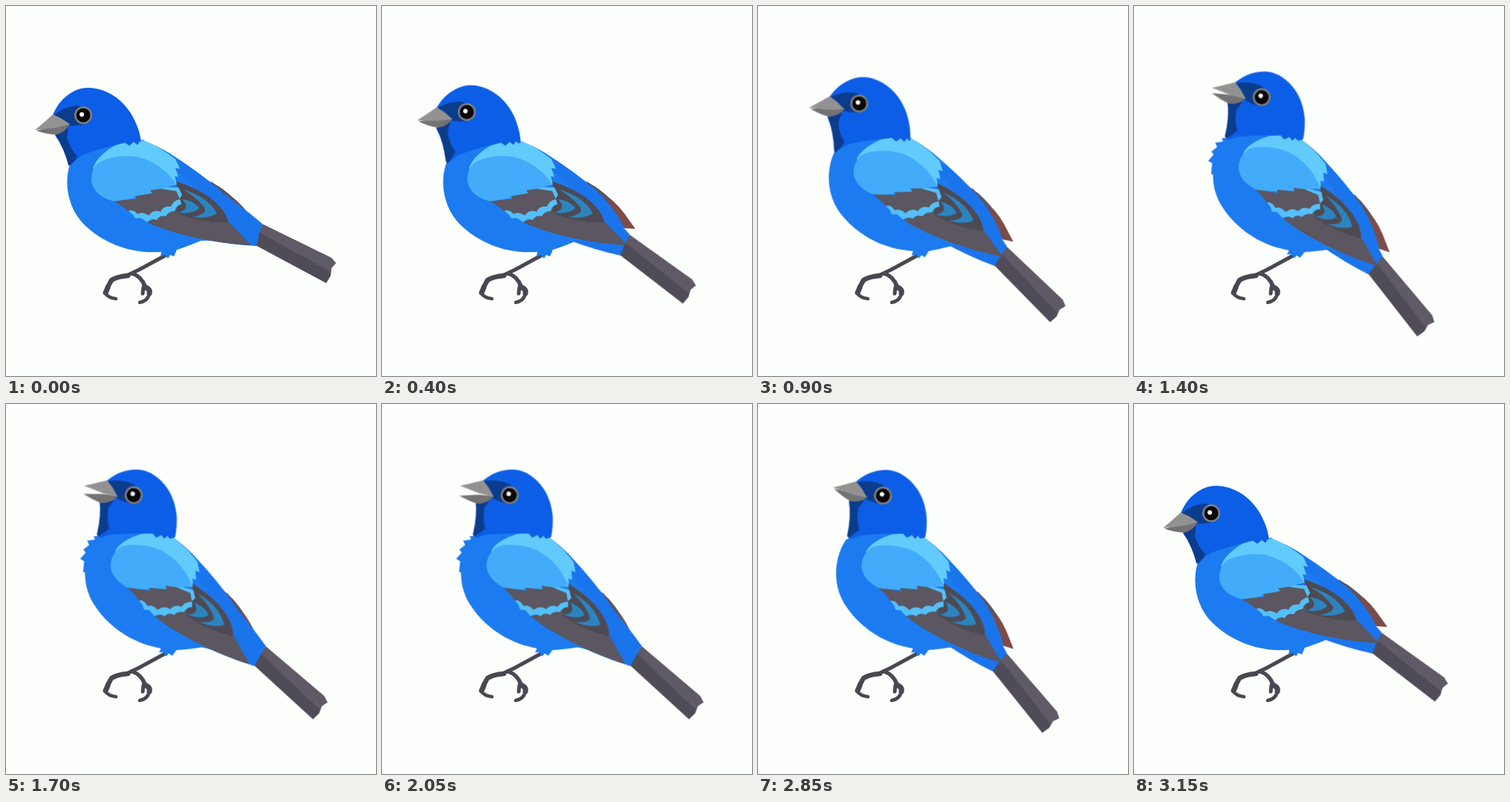
An HTML page that plays this animation: 498 by 498 pixels, repeating every 3200 ms.

```html
<!DOCTYPE html>
<html lang="en">
<head>
<meta charset="utf-8">
<title>Blue bird</title>
<style>
  html, body { margin: 0; width: 100%; height: 100%; overflow: hidden; background: #fdfffc; }
  svg { display: block; width: 100vw; height: 100vh; }

  .bird, .head, .tail, .jaw, .ruffle { animation: 3200ms linear infinite; }
  .bird { transform-origin: 217px 328px; animation-name: lean; }
  .head { transform-origin: 142px 222px; animation-name: nod; }
  .tail { transform-origin: 252px 230px; animation-name: flick; }
  .jaw { transform-origin: 85px 160px; animation-name: sing; }
  .ruffle { animation-name: puff; animation-timing-function: step-end; }

  @keyframes lean {
    0%, 18.75% { transform: rotate(0deg); animation-timing-function: ease-in-out; }
    36.5%, 87.5% { transform: rotate(14.3deg); animation-timing-function: ease-in-out; }
    97.5%, 100% { transform: rotate(0deg); }
  }
  @keyframes nod {
    0%, 3% { transform: rotate(0deg); animation-timing-function: ease-in-out; }
    9%, 13.5% { transform: rotate(7.5deg); animation-timing-function: ease-in-out; }
    18.5%, 22.5% { transform: rotate(0deg); animation-timing-function: ease-in-out; }
    36.5%, 87.5% { transform: rotate(13.5deg); animation-timing-function: ease-in-out; }
    97.5%, 100% { transform: rotate(0deg); }
  }
  /* The loop point is a hard snap upwards. */
  @keyframes flick {
    0%, 6% { transform: rotate(0deg); }
    8%, 48% { transform: rotate(9.5deg); }
    51%, 70.5% { transform: rotate(0deg); }
    73.5%, 100% { transform: rotate(9.5deg); }
  }
  @keyframes sing {
    0%, 36% { transform: rotate(0deg); }
    39%, 45% { transform: rotate(-7deg); }
    48%, 52% { transform: rotate(-15deg); }
    55% { transform: rotate(-7deg); }
    58%, 70% { transform: rotate(-15deg); }
    73%, 82% { transform: rotate(-7deg); }
    85%, 100% { transform: rotate(0deg); }
  }
  @keyframes puff {
    0% { opacity: 0; }
    37.5% { opacity: 1; }
    73.4%, 100% { opacity: 0; }
  }
</style>
</head>
<body>
<svg viewBox="0 0 498 498">
  <defs>
    <clipPath id="neck">
      <path d="M-60 -60H320V150L205 176L194 180L184 185L180 182L177 187L172 183L166 188L160 184Q130 191 110 198Q98 202 87 214L60 222H-60Z"/>
    </clipPath>
  </defs>

  <g fill="none" stroke="#4b4751" stroke-linecap="round" stroke-linejoin="round">
    <path stroke-width="5" d="M214 336L179 355L160 364"/>
    <path stroke-width="6.5" d="M164 363Q150 364 142 369L137 378"/>
    <path stroke-width="7" d="M137 379L134 386"/>
    <path stroke-width="4.5" d="M134 387Q138 393 148 394"/>
    <path stroke-width="5.5" d="M170 360Q182 364 187 377"/>
    <path stroke-width="7" d="M187 378Q195 382 193 387"/>
    <path stroke-width="4.5" d="M193 387Q191 397 180 399"/>
    <path stroke-width="5" d="M185 378L184 387"/>
  </g>

  <g class="bird">
    <path fill="#7c4c48" d="M276 236L287 244Q314 262 326 279L341 300L326 299L280 262Z"/>
    <path fill="#5b5460" d="M270 234L287 243Q300 252 307 260L298 266L272 246Z"/>

    <g class="tail">
      <path fill="#504c57" d="M334 292L346 294L438 339L444 346L438 353L437 363L431 373L334 321Z"/>
      <path fill="#5f5a65" d="M340 292L346 294L438 339L444 346L438 353L437 358L338 303Z"/>
      <path fill="#1a74ec" d="M248 222C280 242 320 272 345 293L341 306L337 323Q300 321 265 314L240 250Z"/>
    </g>

    <path fill="#1a74ec" d="M150 190L183 181Q206 188 229 204Q260 224 286 246Q312 270 326 298L290 300L250 310Z"/>
    <path class="ruffle" fill="#1c7bf0" d="M104 201L84 207L87 211L77 215L81 220L75 228L79 231L74 241L80 243L82 257L104 260Z"/>
    <path fill="#1c7bf0" d="M87 210Q98 198 120 190L185 180L250 240L300 319Q281 315 262 316Q243 324 230 328L226 337L221 335L218 340L214 335L208 337L209 331C165 334 130 318 105 294C83 272 77 237 87 210Z"/>

    <!-- wing -->
    <path fill="#62cbfc" d="M117 219Q121 203 146 188L160 183L186 181Q208 190 228 206L234 219L228 218L232 230L227 229L230 240L190 250Z"/>
    <path fill="#42acfa" d="M115 236Q114 219 126 210Q148 199 177 203Q209 211 229 239L208 248Q175 260 146 263Q118 256 115 236Z"/>
    <path fill="#5b5660" d="M190 291Q215 280 234 264L230 237C265 248 294 268 299 290L330 322C285 320 225 308 190 291Z"/>
    <path fill="#4d4a54" d="M229 236C263 247 293 266 299 291Q272 293 238 282Q225 280 234 264Z"/>
    <path fill="#2c84bf" d="M238 247Q271 256 284 279Q272 287 250 284Q269 281 268 273Q258 258 238 247Z"/>
    <path fill="#2c84bf" d="M237 260Q255 263 260 272Q251 281 232 278Q250 273 237 260Z"/>
    <path fill="#55bff9" d="M160 272L171 281L174 286L181 285L190 291Q196 285 203 288Q207 281 215 283Q219 276 227 276Q229 268 236 267L234 259L237 254L232 244L215 244Z"/>
    <path fill="#5b5660" d="M145 263L160 261L176 260L173 256L197 252L194 248L208 246L229 249L234 260Q225 262 222 270Q212 268 208 277Q199 273 192 282Q184 276 177 280Q171 273 164 276Q157 269 145 263Z"/>

    <g clip-path="url(#neck)">
      <g class="head">
        <path fill="#0c5ee7" d="M63 147C71 126 90 110 111 110C143 111 166 135 175 158Q181 171 182 186L190 220H98L85 217Q78 190 66 174L84 160Z"/>
        <path fill="#0c3c8c" d="M64 147Q79 135 96 134L114 139L113 156Q103 162 84 161Z"/>
        <path fill="#0c3c8c" d="M66 173L84 161L82 178Q86 192 96 202L88 219L85 217Q78 190 66 173Z"/>
        <g class="jaw">
          <path fill="#747275" d="M41 168L66 161L86 158Q82 169 68 173Q56 173 41 168Z"/>
        </g>
        <path fill="#929293" d="M39 167Q51 157 63 146L74 151L86 159L66 164Z"/>
        <circle cx="104" cy="147" r="12" fill="#7f8186"/>
        <circle cx="104" cy="147" r="9.5" fill="#0b0908"/>
        <circle cx="102" cy="146" r="3" fill="#fff"/>
      </g>
    </g>
  </g>
</svg>
</body>
</html>
```
